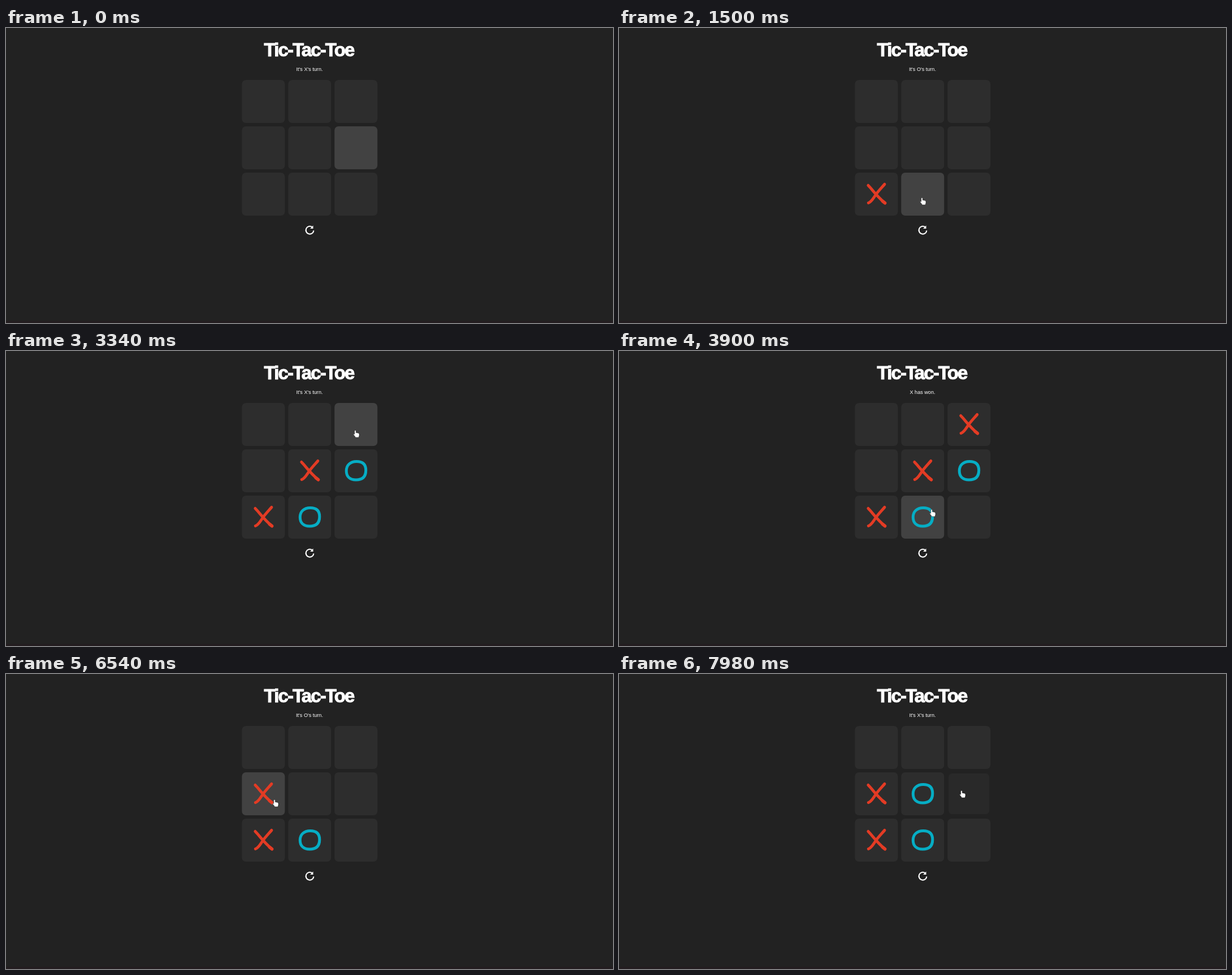
An HTML page that plays this animation: 1074 by 522 pixels, repeating every 8000 ms.

```html
<!DOCTYPE html>
<html lang="en">
<head>
<meta charset="utf-8">
<title>Tic-Tac-Toe</title>
<style>
  html, body { margin: 0; height: 100%; overflow: hidden; background: #222; }
  svg { display: block; width: 1074px; height: 522px; }
  text { fill: #fff; text-anchor: middle; font-family: "Liberation Sans", Arial, sans-serif; }
  .title { font-size: 33px; font-weight: bold; letter-spacing: -1.9px; stroke: #fff; stroke-width: 1px; }
  .status { font-size: 9.1px; }
  .x { fill: none; stroke: #e33b24; stroke-width: 5; stroke-linecap: round; }
  .o { fill: none; stroke: #06adc4; stroke-width: 5; }
  .cursor { fill: #fff; stroke: #111; stroke-width: .5; }
</style>
</head>
<body>
<svg viewBox="0 0 1074 522">
  <defs>
    <g id="X" class="x">
      <path d="M-14.5-15.5C-6-7-1 2 15.5 16M14.5-17.5C8-10 2-4-1 1C-5 6-8 13-14 15.5"/>
      <path d="M11 12.5L15 15.5" stroke-width="5.6"/>
    </g>
    <path id="O" class="o" d="M1-16.5C12-16.5 17.5-11 17.5-1C17.5 11 11 16 0 16C-11 16-17 10-17 0C-17-10-10-16.5 1-16.5Z"/>
  </defs>
  <rect y="518" width="1074" height="4" fill="#231d20"/>
  <text class="title" x="536" y="49.5">Tic-Tac-Toe</text>
  <text class="status" id="status" x="537" y="76"></text>
  <g id="board"></g>
  <g transform="translate(537.5 357.7)">
    <path d="M6.9.6A6.9 6.9 0 1 1 4.2-5.5" fill="none" stroke="#fff" stroke-width="2.1"/>
    <path d="M6-8.2V-2.6H.6Z" fill="#fff"/>
  </g>
  <path id="hand" class="cursor" d="M-1.3 1Q0-.7 1.3 1V4.4L5.4 5.2Q7.2 5.6 7 7.4V9.6L6 12.9H.6Q-.8 10.6-3.2 7.9Q-3.2 6.2-1.3 7.2Z"/>
  <path id="arrow" class="cursor" d="M0 0V10L2.3 7.9L4 11.3L5.6 10.5L4 7.2H7Z"/>
</svg>
<script>
const LOOP = 8000, STEP = 80, SIZE = 76;
const START = { x: 612, y: 218 };
const $ = id => document.getElementById(id);

// Pointer stops: arrival time, x, y and, where it clicks, the time of the press
const stops = [
  [560, 462, 298, 700], [1500, 536, 300, 1580], [2140, 540, 223, 2220], [2620, 581, 236],
  [2860, 612, 215, 3020], [3340, 618, 140, 3420], [3900, 553, 280], [4300, 537, 349, 4460],
  [4940, 458, 298, 5180], [5660, 530, 296, 5740], [6060, 468, 224, 6140], [6540, 475, 222],
  [6860, 540, 214, 7020], [7580, 600, 150], [7900, 606, 206, 7980]
].map(([arrive, x, y, press]) => ({ arrive, x, y, press }));

const svg = (tag, attrs = {}) => {
  const el = document.createElementNS("http://www.w3.org/2000/svg", tag);
  set(el, attrs);
  return el;
};
const set = (el, attrs) => {
  for (const name in attrs) el.setAttribute(name, attrs[name]);
};

const cells = Array.from({ length: 9 }, (_, i) => {
  const x = 417.4 + 81.9 * (i % 3), y = 92 + 82 * Math.floor(i / 3);
  const group = svg("g"), mark = svg("use");
  const box = svg("rect", { x: -SIZE / 2, y: -SIZE / 2, width: SIZE, height: SIZE, rx: 7 });
  group.append(box, mark);
  $("board").append(group);
  return { x, y, group, box, mark };
});

const cellAt = p => cells.findIndex(c =>
  p.x >= c.x && p.x < c.x + SIZE && p.y >= c.y && p.y < c.y + SIZE);

// Each move eases off once the previous stop is over
function pointerAt(t) {
  let from = START, leave = 0;
  for (const stop of stops) {
    if (t < stop.arrive) {
      const k = Math.max(0, (t - leave) / (stop.arrive - leave));
      const ease = k * k * (3 - 2 * k);
      return { x: from.x + (stop.x - from.x) * ease, y: from.y + (stop.y - from.y) * ease };
    }
    from = stop;
    leave = stop.press ? stop.press + STEP : stop.arrive;
    if (t < leave) break;
  }
  return from;
}

// A press lasts one step; the mark appears on release, a press off the board restarts
function gameAt(t) {
  let marks = [], turn = "X", pressed = -1;
  for (const stop of stops) {
    if (!(t >= stop.press)) continue;
    const cell = cellAt(stop);
    if (t < stop.press + STEP) pressed = cell;
    else if (cell < 0) { marks = []; turn = "X"; }
    else { marks[cell] = turn; turn = turn === "X" ? "O" : "X"; }
  }
  const won = [2, 4, 6].every(i => marks[i] === "X");
  return { marks, pressed, status: won ? "X has won." : `It's ${turn}'s turn.` };
}

function draw(t) {
  const pointer = pointerAt(t), hovered = cellAt(pointer);
  const { marks, pressed, status } = gameAt(t);
  cells.forEach((c, i) => {
    const fill = i === pressed ? "#292929" : i === hovered ? "#424242" : "#2d2d2d";
    const scale = i === pressed ? .95 : 1;
    set(c.box, { fill });
    set(c.group, { transform: `translate(${c.x + SIZE / 2} ${c.y + SIZE / 2}) scale(${scale})` });
    set(c.mark, { href: marks[i] ? "#" + marks[i] : "" });
  });
  $("status").textContent = status;
  const onButton = Math.hypot(pointer.x - 537.5, pointer.y - 357.5) < 10;
  const cursor = hovered >= 0 || onButton ? "hand" : "arrow";
  for (const id of ["hand", "arrow"]) {
    set($(id), {
      visibility: t >= STEP && id === cursor ? "visible" : "hidden",
      transform: `translate(${pointer.x} ${pointer.y})`
    });
  }
}

// The screen updates every 80 ms, with one shorter step at 800 ms
const snap = t => {
  const offset = t < 860 ? 0 : 60;
  return Math.floor((t - offset) / STEP) * STEP + offset;
};

const origin = performance.now();
function tick() {
  draw(snap((performance.now() - origin) % LOOP));
  requestAnimationFrame(tick);
}
tick();
</script>
</body>
</html>
```
